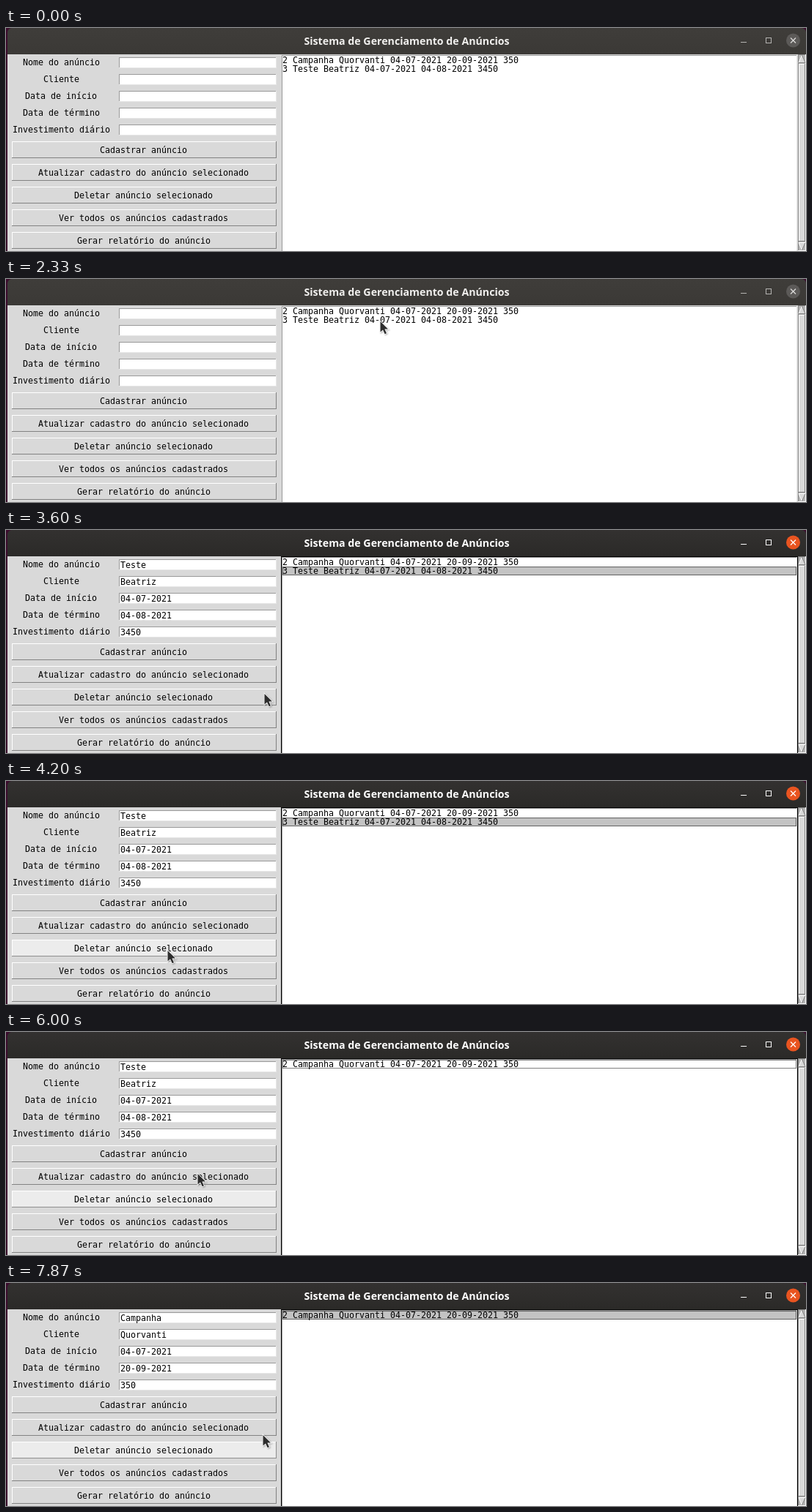
Animation of 1091 by 305 pixels, one loop 8000 ms. Source, as an HTML page with a canvas:

```html
<!DOCTYPE html>
<html lang="pt">
<head>
<meta charset="utf-8">
<style>
  html, body { margin: 0; width: 100%; height: 100%; overflow: hidden; background: #d9d9d9; }
  canvas { display: block; }
</style>
</head>
<body>
<canvas id="stage" width="1091" height="305"></canvas>
<script>
const ctx = document.getElementById('stage').getContext('2d');
const LOOP = 8000, TICK = 200 / 3, HOVER_LAG = 100;
const APPEAR = 1000, FOCUS = 2400, DELETE = 5267, RESELECT = 6800;
const FACE = '#d9d9d9', DARK = '#828282', FIELD_DARK = '#999', FIELD_LIGHT = '#e6e6e6';
const MONO = '11.63px "DejaVu Sans Mono", monospace';
const TITLE = 'bold 14.2px "Open Sans", "Noto Sans", sans-serif';

const labels = ['Nome do anúncio', 'Cliente', 'Data de início', 'Data de término', 'Investimento diário'];
const buttons = ['Cadastrar anúncio', 'Atualizar cadastro do anúncio selecionado',
  'Deletar anúncio selecionado', 'Ver todos os anúncios cadastrados', 'Gerar relatório do anúncio'];
const ads = [
  ['2', 'Campanha', 'Quorvanti', '04-07-2021', '20-09-2021', '350'],
  ['3', 'Teste', 'Beatriz', '04-07-2021', '04-08-2021', '3450']
];

// Pointer glides: start and end time, then the point reached
const glides = [
  { from: 1133, to: 1400, x: 430, y: 83 },
  { from: 1533, to: 1933, x: 503, y: 65 },
  { from: 2067, to: 2333, x: 510, y: 57 },
  { from: 3133, to: 3600, x: 352, y: 223 },
  { from: 3667, to: 3933, x: 240, y: 264 },
  { from: 4000, to: 4133, x: 220, y: 231 },
  { from: 5867, to: 6533, x: 423, y: 41 },
  { from: 7533, to: 7733, x: 352, y: 219 },
  { from: 7800, to: 7867, x: 350, y: 207 }
];

function pointerAt(t) {
  const point = { x: 415, y: 7 };
  for (const { from, to, x, y } of glides) {
    const k = Math.min(1, Math.max(0, (t - from) / (to - from)));
    point.x += (x - point.x) * k;
    point.y += (y - point.y) * k;
  }
  return point;
}

const buttonTop = i => 155 + 31 * i;

function hoveredButton(t) {
  const { x, y } = pointerAt(t - HOVER_LAG);
  return buttons.findIndex((_, i) => x > 8 && x < 369 && y >= buttonTop(i) && y < buttonTop(i) + 23);
}

function rect(x, y, w, h, color) {
  ctx.fillStyle = color;
  ctx.fillRect(x, y, w, h);
}

function bevel(x, y, w, h, fill, light, shade) {
  rect(x, y, w, h, shade);
  rect(x, y, w - 1, h - 1, light);
  rect(x + 1, y + 1, w - 2, h - 2, fill);
}

function text(string, x, y) {
  ctx.font = MONO;
  ctx.fillStyle = '#000';
  ctx.fillText(string, x, y);
}

function centered(string, center, y) {
  text(string, Math.round(center - string.length * 3.5), y);
}

function line(x0, y0, x1, y1, color, width = 1) {
  ctx.strokeStyle = color;
  ctx.lineWidth = width;
  ctx.beginPath();
  ctx.moveTo(x0, y0);
  ctx.lineTo(x1, y1);
  ctx.stroke();
}

// Raised triangle with its base at one height and its tip at another
function arrow(base, tip) {
  ctx.fillStyle = FACE;
  ctx.beginPath();
  ctx.moveTo(1081, base);
  ctx.lineTo(1090, base);
  ctx.lineTo(1085.5, tip);
  ctx.fill();
  line(1081, base, 1085.5, tip, '#fff');
  line(1090, base, 1085.5, tip, DARK);
  line(1081, base, 1090, base, tip < base ? DARK : '#fff');
}

function drawTitleBar(focused) {
  rect(0, 0, 1091, 36, '#3b0c2d');
  const shade = ctx.createLinearGradient(0, 0, 0, 36);
  shade.addColorStop(0, focused ? '#333130' : '#3f3d3a');
  shade.addColorStop(1, focused ? '#2b2a28' : '#3b3936');
  ctx.fillStyle = shade;
  ctx.beginPath();
  ctx.roundRect(2, 0, 1089, 37, [6, 6, 0, 0]);
  ctx.fill();

  ctx.font = TITLE;
  ctx.textAlign = 'center';
  ctx.fillStyle = focused ? '#fff' : '#f0efed';
  ctx.fillText('Sistema de Gerenciamento de Anúncios', 546.5, 23);
  ctx.textAlign = 'left';

  const ink = focused ? '#fff' : '#b5b4b2';
  rect(1002, 19, 8, 1, ink);
  ctx.strokeStyle = ink;
  ctx.lineWidth = 1;
  ctx.strokeRect(1036.5, 13.5, 7, 7);
  ctx.beginPath();
  ctx.arc(1073.5, 17, 9.5, 0, 7);
  ctx.fillStyle = focused ? '#e95420' : '#5c5a58';
  ctx.fill();
  const cross = focused ? '#fff' : '#dddcda';
  line(1070, 13.5, 1077, 20.5, cross, 1.2);
  line(1077, 13.5, 1070, 20.5, cross, 1.2);
}

function drawForm(ad, hover) {
  labels.forEach((label, i) => {
    const y = 40 + 23 * i;
    centered(label, 75, y + 11);
    bevel(154, y, 215, 15, '#fff', FIELD_DARK, FIELD_LIGHT);
    if (ad) text(ad[i + 1], 156, y + 12);
  });
  buttons.forEach((label, i) => {
    const y = buttonTop(i), lit = i === hover;
    bevel(8, y, 361, 23, lit ? '#ececec' : FACE, '#fff', lit ? '#8e8e8e' : DARK);
    centered(label, 187.5, y + 16);
  });
}

function drawList(rows, selected, active, focused) {
  rect(375, 36, 705, 269, focused ? '#000' : FACE);
  bevel(376, 37, 703, 270, '#fff', FIELD_DARK, FIELD_LIGHT);
  rows.forEach((row, i) => {
    const y = 38 + 12 * i;
    if (i === selected) rect(377, y, 701, 12, '#c3c3c3');
    text(row.join(' '), 377, y + 10);
    if (i === active) {
      ctx.strokeStyle = '#000';
      ctx.lineWidth = 1;
      ctx.setLineDash([1, 1]);
      ctx.strokeRect(377.5, y + 0.5, 700, 11);
      ctx.setLineDash([]);
    }
  });
}

function drawScrollbar() {
  bevel(1080, 36, 11, 269, '#b3b3b3', DARK, '#fff');
  arrow(47.5, 37);
  bevel(1081, 49, 9, 243, FACE, '#fff', DARK);
  arrow(293.5, 304);
}

function drawPointer({ x, y }) {
  ctx.save();
  ctx.translate(Math.round(x), Math.round(y));
  const shape = new Path2D('M.5 1V15.5L4 12.4 6.6 18.3 9 17.2 6.4 11.6H11Z');
  ctx.shadowColor = 'rgba(0, 0, 0, 0.3)';
  ctx.shadowBlur = 2;
  ctx.shadowOffsetX = ctx.shadowOffsetY = 1;
  ctx.strokeStyle = '#fff';
  ctx.lineWidth = 1.6;
  ctx.stroke(shape);
  ctx.shadowColor = 'transparent';
  ctx.fillStyle = '#2d2d2d';
  ctx.fill(shape);
  ctx.restore();
}

function draw(time) {
  // The screen refreshes 15 times a second.
  const t = Math.floor((time % LOOP + 4) / TICK) * TICK + 0.5;
  const focused = t >= FOCUS, deleted = t >= DELETE, reselected = t >= RESELECT;

  drawTitleBar(focused);
  rect(0, 36, 2, 269, '#3b0c2d');
  rect(2, 36, 1089, 269, FACE);
  drawForm(reselected ? ads[0] : focused ? ads[1] : null, hoveredButton(t));
  const selected = reselected ? 0 : focused && !deleted ? 1 : -1;
  const active = !focused ? -1 : deleted ? 0 : 1;
  drawList(deleted ? ads.slice(0, 1) : ads, selected, active, focused);
  drawScrollbar();
  if (t >= APPEAR) drawPointer(pointerAt(t));
}

const start = performance.now();
function frame() {
  draw(performance.now() - start);
  requestAnimationFrame(frame);
}
frame();
</script>
</body>
</html>
```
